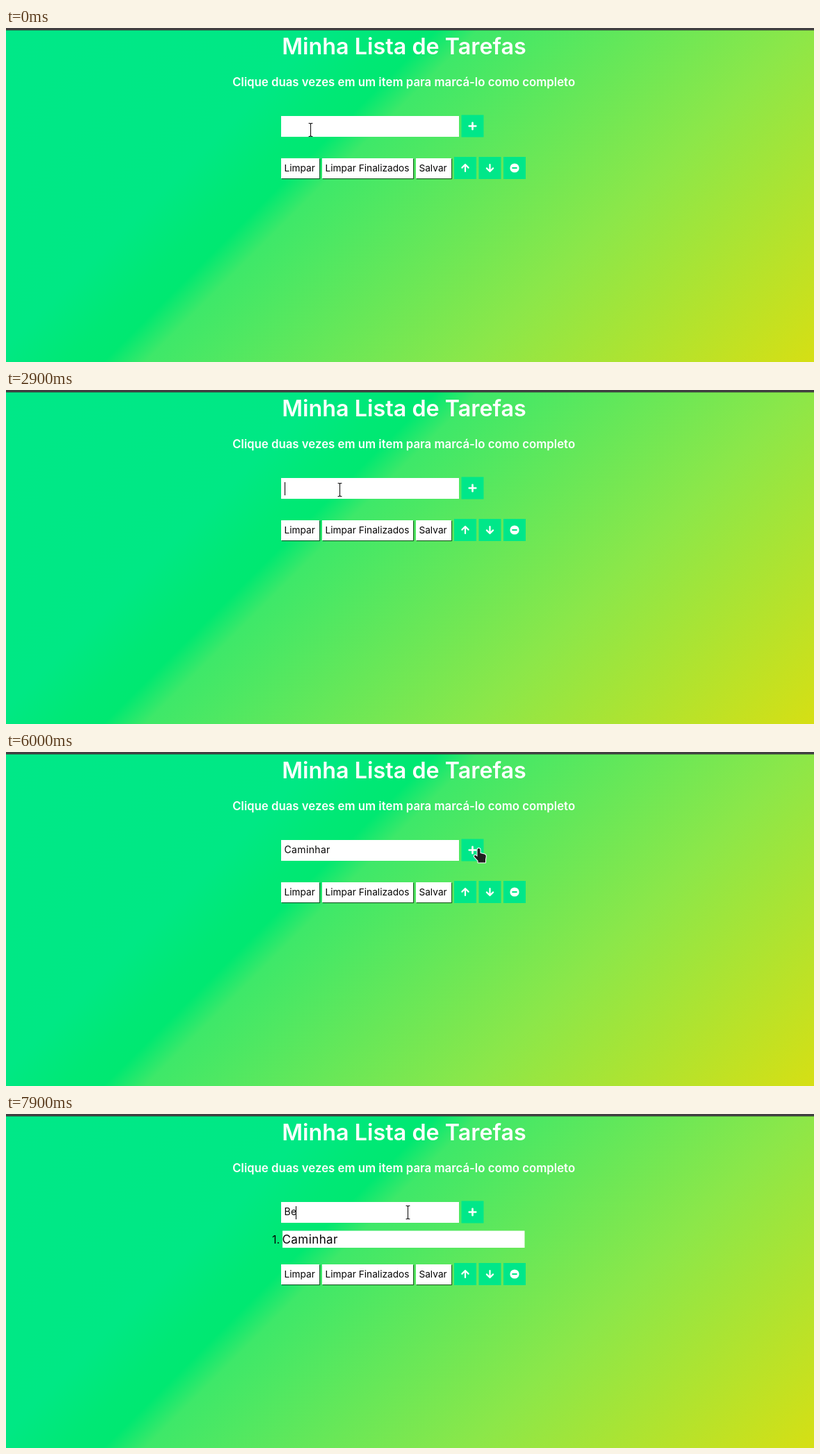
Animation of 1163 by 482 pixels, one loop 8000 ms. Source, as an HTML page with a canvas:

```html
<!DOCTYPE html>
<html lang="pt-BR">
<head>
<meta charset="utf-8">
<title>Minha Lista de Tarefas</title>
<style>
  html, body { margin: 0; width: 100%; height: 100%; overflow: hidden; background: #00e887; }
  canvas { display: block; }
</style>
</head>
<body>
<canvas id="stage" width="1163" height="482"></canvas>
<script>
const W = 1163, H = 482, LOOP = 8000;
const GREEN = '#00e789', INK = '#050505';
const ctx = document.getElementById('stage').getContext('2d');

// Pointer path: [time, x, y, shape]
const POINTER = [
  [0, 439, 147, 'beam'], [100, 440, 148, 'beam'], [200, 444, 146, 'beam'],
  [300, 450, 142, 'beam'], [400, 455, 139, 'beam'], [500, 456, 138, 'beam'],
  [700, 456, 142, 'beam'], [900, 456, 135, 'beam'], [1000, 455, 118, 'arrow'],
  [1100, 454, 119, 'arrow'], [1400, 454, 122, 'arrow'], [1500, 474, 146, 'beam'],
  [1600, 481, 144, 'beam'], [5100, 508, 148, 'beam'], [5200, 535, 152, 'beam'],
  [5300, 566, 158, 'arrow'], [5400, 598, 165, 'arrow'], [5500, 628, 167, 'arrow'],
  [5600, 652, 164, 'arrow'], [5700, 668, 151, 'hand'], [5800, 674, 144, 'hand'],
  [5900, 678, 141, 'hand'], [6000, 681, 140, 'hand'], [6200, 671, 140.5, 'hand'],
  [6300, 667, 140, 'hand'], [6400, 642, 140, 'beam'], [6500, 615, 139, 'beam'],
  [6600, 595, 139, 'beam'], [6700, 584, 139, 'beam'], [6800, 579, 139, 'beam'],
  [7000, 579, 144, 'beam'], [7100, 579, 142, 'beam']
];

// Input content: [time, text, caret x]
const TYPING = [
  [0, '', 401], [3100, 'C', 411], [3400, 'Ca', 419], [3700, 'Cam', 433],
  [4000, 'Cami', 436], [4100, 'Camin', 444], [4300, 'Caminh', 453],
  [4400, 'Caminha', 462], [4600, 'Caminhar', 467], [6200, '', 401],
  [7700, 'B', 409], [7900, 'Be', 417]
];

const CARET = [
  [0, false], [400, true], [1000, false], [1600, true], [2200, false],
  [2900, true], [5200, false], [5600, true], [6000, false], [6800, true],
  [7400, false], [7700, true]
];

const at = (keys, t) => keys.findLast(key => key[0] <= t);

function rect(x, y, w, h, color) {
  ctx.fillStyle = color;
  ctx.fillRect(x, y, w, h);
}

function text(str, x, y, size, { weight = 400, color = INK, align = 'left', spacing = '0px' } = {}) {
  ctx.font = `${weight} ${size}px Inter, "Open Sans", sans-serif`;
  ctx.letterSpacing = spacing;
  ctx.textAlign = align;
  ctx.fillStyle = color;
  ctx.fillText(str, x, y);
}

function stroke(d, color, width) {
  ctx.strokeStyle = color;
  ctx.lineWidth = width;
  ctx.lineCap = ctx.lineJoin = 'round';
  ctx.stroke(new Path2D(d));
}

function placed(x, y, draw) {
  ctx.save();
  ctx.translate(x, y);
  draw();
  ctx.restore();
}

function background() {
  const mid = (W + H) / 2;
  const g = ctx.createLinearGradient(0, 0, mid, mid);
  g.addColorStop(0, 'rgb(0,232,136)');
  g.addColorStop(0.28, 'rgb(0,232,132)');
  g.addColorStop(0.345, 'rgb(0,232,117)');
  g.addColorStop(0.378, 'rgb(0,232,113)');
  g.addColorStop(0.415, 'rgb(62,232,105)');
  g.addColorStop(0.7, 'rgb(140,231,73)');
  g.addColorStop(1, 'rgb(214,223,20)');
  rect(0, 0, W, H, g);
  rect(0, 0, W, 3, '#403e40');
  rect(0, 3, W, 1, 'rgba(50,70,55,.45)');
}

const icons = {
  plus: () => stroke('M-4.8 0H4.8M0-4.8V4.8', '#fff', 2.6),
  up: () => stroke('M0 5V-4.5M-4.6-.4L0-5L4.6-.4', '#fff', 2.2),
  down: () => stroke('M0-5V4.5M-4.6 .4L0 5L4.6 .4', '#fff', 2.2),
  minus() {
    ctx.fillStyle = '#fff';
    ctx.beginPath();
    ctx.arc(0, 0, 6.6, 0, Math.PI * 2);
    ctx.fill();
    rect(-3.6, -1.1, 7.2, 2.2, GREEN);
  }
};

function iconButton(x, y, icon, alpha = 1) {
  rect(x, y, 32, 32, GREEN);
  placed(x + 16, y + 16, () => {
    ctx.globalAlpha = alpha;
    icons[icon]();
  });
}

function textButton(x, y, w, label) {
  ctx.save();
  ctx.shadowColor = 'rgba(0,0,0,.6)';
  ctx.shadowOffsetX = ctx.shadowOffsetY = 1;
  ctx.shadowBlur = 1;
  rect(x, y, w, 29, '#fff');
  ctx.restore();
  text(label, x + 4.4, y + 19, 13.7);
}

function toolbar(y) {
  textButton(396, y, 55, 'Limpar');
  textButton(455, y, 131, 'Limpar Finalizados');
  textButton(590, y, 51, 'Salvar');
  iconButton(645, y - 2, 'up');
  iconButton(680.5, y - 2, 'down');
  iconButton(716, y - 2, 'minus');
}

function outlined(d) {
  stroke(d, '#fff', 2);
  ctx.fillStyle = '#202020';
  ctx.fill(new Path2D(d));
}

const pointers = {
  beam: () => stroke('M-2.5-9.5H-1L0-8.5L1-9.5H2.5M0-8.5V8.5M-2.5 9.5H-1L0 8.5L1 9.5H2.5', '#151515', 1.1),
  arrow: () => outlined('M0 0V21.5L5.6 15.8L14 15Z'),
  hand: () => outlined('M-2 1Q-2-1 0-1Q2-1 2 1V6L8 7.5Q10.5 8 10.3 11L9.5 15V19.5H-1V17L-6.5 11' +
    'Q-7 9-5 8.7L-2 11Z')
};

function render(t) {
  const added = t >= 6200;
  const [, value, caretX] = at(TYPING, t);
  const [, px, py, shape] = at(POINTER, t);
  const heading = { weight: 600, color: '#fff', align: 'center' };

  background();
  text('Minha Lista de Tarefas', 573, 38, 32.3, heading);
  text('Clique duas vezes em um item para marcá-lo como completo', 572.5, 84, 16.8, heading);

  rect(396, 127, 256, 30, '#fff');
  text(value, 400.5, 146, 14, { spacing: '0.025em' });
  if (at(CARET, t)[1]) rect(caretX, 133, 1, 19, '#000');
  iconButton(655.5, 125.5, 'plus', added && t < 6300 ? 0.55 : 1);

  if (added) {
    text('1.', 394, 187, 16, { align: 'right' });
    rect(398, 168.5, 348.5, 24.5, '#fff');
    text('Caminhar', 397.5, 187, 17, { spacing: '0.025em' });
  }
  toolbar(added ? 217 : 188);
  placed(px - 0.5, py, pointers[shape]);
}

function frame() {
  render(performance.now() % LOOP);
  requestAnimationFrame(frame);
}
frame();
</script>
</body>
</html>
```
